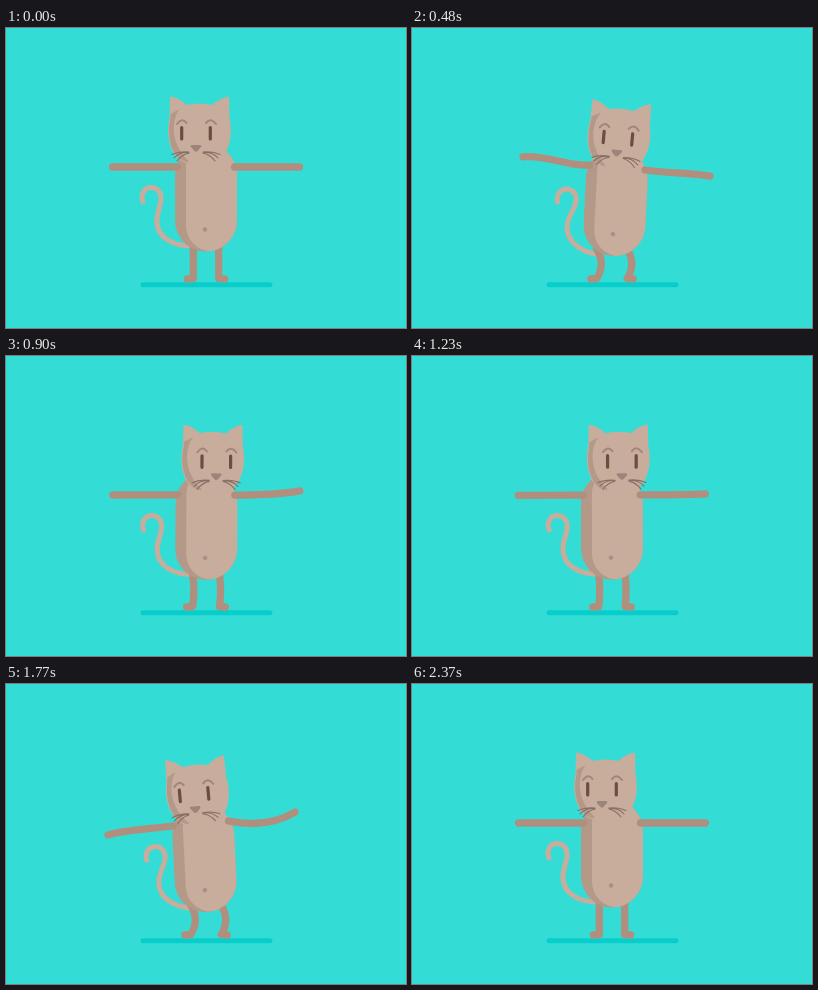
Recreate the animation shown at these times as an HTML page. Size 400x300 px, loop 2.4 s.

```html
<!DOCTYPE html>
<html lang="en">
<head>
<meta charset="utf-8">
<title>Cat arm wave</title>
<style>
  html, body { margin: 0; width: 100%; height: 100%; overflow: hidden; background: #33ddd6; }
  svg { display: block; width: 100vw; height: 100vh; }
  .line { fill: none; stroke-linecap: round; stroke-linejoin: round; }
  .limb { stroke: #b18f7f; stroke-width: 7.3; }
  .light { fill: #c8ac9c; }
  .dark { fill: #b49888; }
</style>
</head>
<body>
<svg viewBox="0 0 400 300">
  <defs>
    <clipPath id="trunk"><rect x="169" y="116" width="62" height="107.5" rx="31"/></clipPath>
    <path id="skull" d="M-28.500-36.500Q-21-35-13-28Q0-31 13-28Q21-35 28.500-36.500L29-16C33 2 28 20 18 26C8 31-8 31-18 26C-28 20-33 2-29-16Z"/>
    <clipPath id="skullClip"><use href="#skull"/></clipPath>
    <path id="whiskers" d="M7 18.500Q16 17.500 22 24M7 19Q14 20.500 19 27M7 18Q17 17 24 20.500"/>
  </defs>
  <path class="line" d="M137 256.800H264" stroke="#08cdca" stroke-width="5"/>
  <path id="tail" class="line" d="M186 218C166 218 152 209 151 195C150 184 155 180 155 170C155 163 150 159.500 145 159.500C138 159.500 134 167 137 174" stroke="#c8ac9c" stroke-width="5"/>
  <path id="legL" class="line limb"/>
  <path id="legR" class="line limb"/>
  <g id="body">
    <g clip-path="url(#trunk)">
      <rect class="dark" x="169" y="116" width="62" height="108"/>
      <rect class="light" x="180" y="112" width="52" height="111.500" rx="26"/>
    </g>
    <circle cx="199" cy="201.500" r="2.200" fill="#aa8e80"/>
  </g>
  <g id="head">
    <use href="#skull" class="light" stroke="#c8ac9c" stroke-width="2" stroke-linejoin="round"/>
    <path class="dark" clip-path="url(#skullClip)" d="M-20-25C-30-10-27 12-11 27L-14 34H-40V-14Z"/>
    <g id="face">
      <g class="line" stroke="#a1867a" stroke-width="2">
        <path d="M-19-10Q-14-17-9.500-11"/><path d="M10-11Q15-17 20-10"/>
      </g>
      <path class="line" d="M-14.300-6.500V5M14.300-6.500V5" stroke="#6c4d3f" stroke-width="3.200"/>
      <path d="M-4 11H4Q6 11 5 13L1.500 17Q0 18 -1.500 17L-5 13Q-6 11-4 11Z" fill="#9b857b"/>
      <g class="line" stroke="#866f64" stroke-width="1.100">
        <use href="#whiskers"/><use href="#whiskers" transform="scale(-1 1)"/>
      </g>
    </g>
  </g>
  <g id="arms">
    <path id="leadArm" class="line limb"/>
    <path id="farArm" class="line limb"/>
  </g>
</svg>
<script>
const HALF = 1200, STEP = 30;
const $ = id => document.getElementById(id);
const place = (id, transform) => $(id).setAttribute('transform', transform);

// Smooth rise from 0 to 1 between two times.
function ease(t, from, to) {
  const u = Math.min(1, Math.max(0, (t - from) / (to - from)));
  return u * u * (3 - 2 * u);
}

// Smooth bump of height 1 around a time.
function pulse(t, mid, width) {
  const u = (t - mid) / width;
  return Math.abs(u) < 1 ? Math.cos(u * Math.PI / 2) ** 2 : 0;
}

// Heights are offsets from the outstretched pose.
function drawArm(id, hx, hand, outer, inner, sx, shoulder) {
  const y = 139, third = (sx - hx) / 3, lean = -outer * 0.05 * Math.sign(third);
  $(id).setAttribute('d', `M${hx} ${y + hand}C${hx + third + lean * 3} ${y + outer} ${
    sx - third + lean} ${y + inner} ${sx} ${y + shoulder}`);
}

function drawLeg(id, side, crouch) {
  const bend = Math.sqrt(crouch), x = 200 + side * (12.7 + 2.5 * bend);
  $(id).setAttribute('d', `M${x} ${217 + 4 * crouch}Q${x + 9 * bend} 236 ${x} 250.500L${x + side * 6} 251`);
}

function draw(time) {
  const t = time % HALF, back = time >= HALF, dir = back ? -1 : 1;
  const crouch = ease(t, 0, 260) - ease(t, 650, 950);
  const drop = 4.6 * crouch;

  // The wave runs out from the leading hand and arrives in the far arm.
  const dip = 7 * pulse(t, 690, 200);
  const arrive = pulse(t, 750, 170);
  const farBend = 6 * crouch - 17 * arrive;
  place('arms', back ? 'matrix(-1 0 0 1 400 0)' : '');
  drawArm('leadArm',
    106.5 + 4.5 * crouch, -11 * (pulse(t, 150, 150) + pulse(t, 540, 340)),
    dip - 46 * pulse(t, 350, 200), dip,
    171.5 + 6 * crouch, -2 * crouch);
  drawArm('farArm',
    293.5 + 4.5 * crouch, 9 * crouch + 5 * pulse(t, 660, 200) - 7 * pulse(t, 840, 160),
    farBend, farBend,
    228.5 + 4.5 * crouch, 3 * crouch - 4 * arrive);

  drawLeg('legL', -1, crouch);
  drawLeg('legR', 1, crouch);
  place('body', `translate(${crouch} ${drop}) rotate(${dir * 2.8 * crouch} 200 223)`);
  place('tail', `translate(0 ${drop}) rotate(${(back ? 5 : 11) * crouch} 165 216)`);

  // The head slides across, then the face turns after the wave.
  const slide = 13 * ease(t, 0, 660) - 6.5 + 2.5 * crouch;
  const turn = (3.5 + 1.5 * crouch) * (2 * ease(t, 350, 640) - 1);
  place('head', `translate(${200 + dir * slide} ${106 + 1.1 * drop}) rotate(${dir * 5 * crouch})`);
  place('face', `translate(${dir * turn} 0)`);
}

function tick() {
  const now = performance.now() % (2 * HALF);
  draw(Math.floor(now / STEP) * STEP);
  requestAnimationFrame(tick);
}
tick();
</script>
</body>
</html>
```
